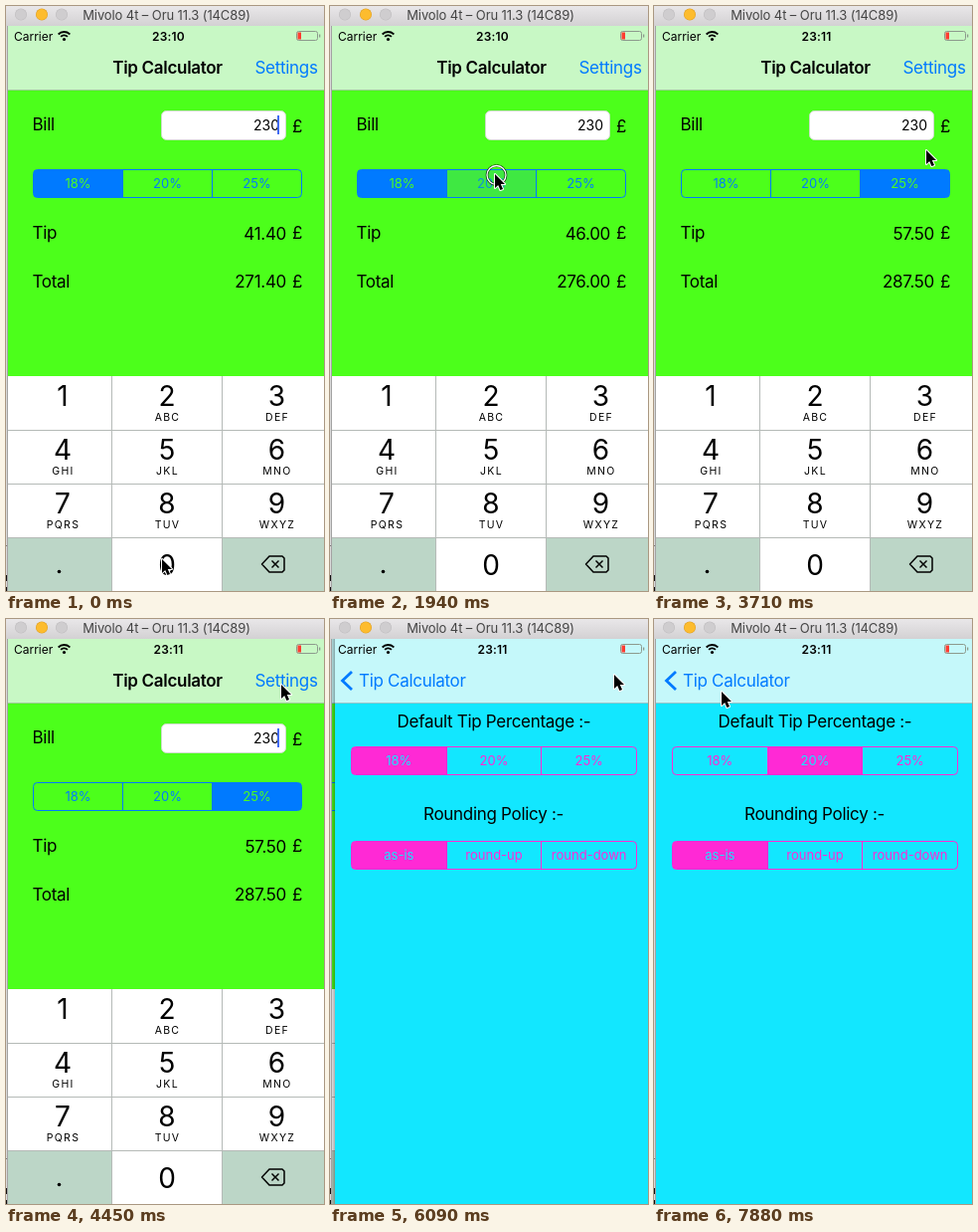
An HTML page with a canvas that plays this animation: 320 px wide and 588 px high, repeating every 8000 ms.

```html
<!DOCTYPE html>
<html lang="en">
<head>
<meta charset="utf-8">
<title>Tip Calculator</title>
<style>
html, body { margin: 0; width: 100%; height: 100%; overflow: hidden; background: #fff; }
canvas { display: block; width: 320px; height: 588px; }
</style>
</head>
<body>
<canvas id="stage"></canvas>
<script>
const W = 320, H = 588, LOOP = 8000, TICK = 148.2;
const canvas = document.getElementById('stage');
const ctx = canvas.getContext('2d');
const dpr = window.devicePixelRatio || 1;
canvas.width = W * dpr;
canvas.height = H * dpr;

const BLUE = [0, 122, 255], GREEN = [76, 255, 27];
const PINK = [255, 41, 213], CYAN = [18, 231, 255];
const rgb = c => `rgb(${c.map(Math.round).join()})`;
const mix = (a, b, f) => a.map((v, i) => v + (b[i] - v) * f);

// Pointer path: tick, x, y
const PATH = [
  [3, 157, 556], [5, 158, 470], [7, 162, 300], [9, 165, 180], [10, 166, 169],
  [15, 166, 169], [17, 205, 172], [19, 253, 174],
  [23, 253, 174], [25, 274, 145], [27, 294, 92], [28, 287, 60], [30, 277, 66],
  [31, 277, 66], [34, 286, 56],
  [42, 286, 56], [44, 235, 98], [46, 166, 137], [47, 160, 139],
  [50, 160, 139], [52, 88, 96], [53, 68, 73]
];
const PRESSES = [[11, 14], [20, 24], [37, 39], [49, 51]];

// Segment fill amounts from a given tick on
const RATE_FILL = [
  [0, [1, 0, 0]], [11, [1, .17, 0]], [14, [0, 1, 0]], [20, [0, 1, .17]],
  [21, [0, .54, .54]], [22, [0, .1, .9]], [23, [0, 0, 1]]
];
const DEFAULT_FILL = [[0, [1, 0, 0]], [49, [1, .17, 0]], [50, [.5, .5, 0]], [51, [0, 1, 0]]];
const latest = (list, k) => list.filter(e => e[0] <= k).pop()[1];

function rect(x, y, w, h, color) {
  ctx.fillStyle = color;
  ctx.fillRect(x, y, w, h);
}

function text(s, x, y, o = {}) {
  const { size = 17, weight = 400, color = '#000', align = 'left', gap = size > 15 ? -.3 : 0 } = o;
  ctx.font = `${weight} ${size}px Inter, Roboto, sans-serif`;
  ctx.letterSpacing = gap + 'px';
  ctx.textAlign = align;
  ctx.fillStyle = color;
  ctx.fillText(s, x, y);
}

function line(points, color, width) {
  ctx.beginPath();
  points.forEach(([x, y]) => ctx.lineTo(x, y));
  ctx.strokeStyle = color;
  ctx.lineWidth = width;
  ctx.stroke();
}

function disc(x, y, r, color) {
  ctx.beginPath();
  ctx.arc(x, y, r, 0, 7);
  ctx.fillStyle = color;
  ctx.fill();
}

function segments(x, y, w, labels, fills, tint, back) {
  const cell = w / labels.length;
  ctx.save();
  ctx.beginPath();
  ctx.roundRect(x, y, w, 28, 4);
  ctx.clip();
  fills.forEach((f, i) => {
    if (f) rect(x + i * cell, y, cell, 28, rgb(mix(back, tint, f)));
  });
  ctx.restore();
  ctx.beginPath();
  ctx.roundRect(x, y, w, 28, 4);
  ctx.strokeStyle = rgb(tint);
  ctx.lineWidth = 1;
  ctx.stroke();
  labels.forEach((s, i) => {
    const left = Math.floor(x + i * cell) + .5;
    if (i) line([[left, y], [left, y + 28]], rgb(tint), 1);
    text(s, x + (i + .5) * cell, y + 18.7,
      { size: 13, align: 'center', color: rgb(mix(tint, back, fills[i])) });
  });
}

function windowFrame() {
  rect(0, 0, W, H, '#fff');
  const g = ctx.createLinearGradient(0, 0, 0, 20);
  g.addColorStop(0, '#e9e7e9');
  g.addColorStop(1, '#d3d1d3');
  rect(0, 0, W, 20, g);
  rect(0, 20, 1, H - 20, '#d9d9d9');
  rect(1, 20, 1, H - 20, '#a3a3a3');
  rect(0, 542, 1, 1, '#777');
  rect(0, 572, 1, 6, '#111');
  rect(0, 584, 1, 4, '#111');
  [[15, '#cfcdcf'], [36, '#fdbc2e'], [56, '#cfcdcf']].forEach(([x, color]) => {
    disc(x, 8.5, 6, color === '#fdbc2e' ? '#e0a023' : '#bfbdbf');
    disc(x, 8.5, 5.4, color);
  });
  text('Mivolo 4t – Oru 11.3 (14C89)', 161.5, 14, { size: 13, align: 'center', color: '#444', gap: -.1 });
}

function statusBar(k) {
  text('Carrier', 8, 34.5, { size: 12 });
  disc(58.5, 33.5, 1.6, '#000');
  [4.6, 8].forEach(r => {
    ctx.beginPath();
    ctx.arc(58.5, 34, r, -Math.PI * .76, -Math.PI * .24);
    ctx.strokeStyle = '#000';
    ctx.lineWidth = 1.9;
    ctx.stroke();
  });
  text(k < 18 ? '23:10' : '23:11', 163.5, 34.5, { size: 12, weight: 600, align: 'center', gap: .2 });
  ctx.beginPath();
  ctx.roundRect(292.5, 25.5, 21, 9, 2);
  ctx.strokeStyle = '#8d9a8d';
  ctx.lineWidth = 1;
  ctx.stroke();
  rect(315, 28.5, 1.3, 3, '#8d9a8d');
  rect(293.5, 26.5, 3.5, 7, '#ff3b30');
}

function keypad() {
  rect(2, 372, 318, 216, '#fff');
  rect(2, 535, 104, 53, '#bcd6c7');
  rect(218, 535, 102, 53, '#bcd6c7');
  [106, 217].forEach(x => rect(x, 372, 1, 216, '#b5bab7'));
  [426, 480, 534].forEach(y => rect(2, y, 318, 1, '#b5bab7'));
  const cols = [57, 162, 272.5];
  ['', 'ABC', 'DEF', 'GHI', 'JKL', 'MNO', 'PQRS', 'TUV', 'WXYZ'].forEach((s, i) => {
    const x = cols[i % 3], y = 402 + Math.floor(i / 3) * 54;
    text(i + 1, x, y, { size: 28, align: 'center', gap: 0 });
    text(s, x + .5, y + 15, { size: 10.5, align: 'center', gap: 1.3 });
  });
  text('0', 162, 571.5, { size: 28, align: 'center', gap: 0 });
  disc(53.5, 568.5, 1.8, '#000');
  ctx.lineJoin = 'round';
  ctx.beginPath();
  [[257.5, 561], [265, 553], [278, 553], [280, 555], [280, 567], [278, 569], [265, 569]]
    .forEach(([x, y]) => ctx.lineTo(x, y));
  ctx.closePath();
  ctx.strokeStyle = '#000';
  ctx.lineWidth = 1.5;
  ctx.stroke();
  line([[267.5, 557.5], [274.5, 564.5]], '#000', 1.5);
  line([[274.5, 557.5], [267.5, 564.5]], '#000', 1.5);
}

function calculator(k) {
  const bill = 230, rate = k < 13 ? .18 : k < 21 ? .2 : .25;
  const tip = bill * rate;
  const right = { align: 'right' };
  rect(2, 20, 318, 64, '#c8f8c5');
  rect(2, 84, 318, 1, '#9ccb94');
  rect(2, 85, 318, 287, rgb(GREEN));
  text('Tip Calculator', 162.5, 68, { weight: 600, align: 'center' });
  ctx.globalAlpha = k < 38 ? 1 : .22;
  text('Settings', 250.5, 68, { color: rgb(BLUE) });
  ctx.globalAlpha = 1;

  text('Bill', 26.5, 125);
  text('Tip', 26.5, 234);
  text('Total', 26.5, 283);
  text(tip.toFixed(2), 282, 235, right);
  text((bill + tip).toFixed(2), 282, 283, right);
  [127, 234, 283].forEach(y => text('£', 298, y, right));

  ctx.beginPath();
  ctx.roundRect(156.5, 105.5, 125, 29, 5);
  ctx.fillStyle = '#fff';
  ctx.fill();
  ctx.strokeStyle = '#cfdccb';
  ctx.lineWidth = 1;
  ctx.stroke();
  text(bill, 275, 125, { size: 14, align: 'right' });
  if (k % 6.75 < 3.5) rect(273, 110, 2, 19, '#426bf2');

  segments(27.5, 164.5, 270, ['18%', '20%', '25%'], latest(RATE_FILL, k), BLUE, GREEN);
  keypad();
}

function settings(k, dx) {
  rect(2, 20, 318, 64, '#c5f8fa');
  rect(2, 84, 318, 1, '#92c5cb');
  ctx.lineJoin = 'miter';
  line([[22, 53], [12.5, 62], [22, 71]], rgb(BLUE), 2.8);
  text('Tip Calculator', 29, 68, { color: rgb(BLUE) });
  ctx.save();
  ctx.translate(dx, 0);
  rect(2, 85, 318, 503, rgb(CYAN));
  text('Default Tip Percentage :-', 162, 109, { align: 'center' });
  text('Rounding Policy :-', 161.5, 202, { align: 'center' });
  segments(18.5, 128.5, 287, ['18%', '20%', '25%'], latest(DEFAULT_FILL, k), PINK, CYAN);
  segments(18.5, 223.5, 287, ['as-is', 'round-up', 'round-down'], [1, 0, 0], PINK, CYAN);
  ctx.restore();
}

function slideIn(k, dx) {
  ctx.save();
  ctx.beginPath();
  ctx.rect(2, 85, dx, 503);
  ctx.clip();
  ctx.translate(-95, 0);
  calculator(k);
  ctx.restore();
  const g = ctx.createLinearGradient(2, 0, 2 + dx, 0);
  g.addColorStop(0, 'rgba(0,0,0,.13)');
  g.addColorStop(1, 'rgba(0,0,0,.32)');
  rect(2, 20, dx, 568, g);
}

function pointer(k) {
  const i = PATH.findIndex(p => p[0] >= k);
  const b = PATH[i < 0 ? PATH.length - 1 : i], a = PATH[Math.max(0, i - 1)];
  const f = i <= 0 ? 1 : (k - a[0]) / (b[0] - a[0]);
  const [, x, y] = mix(a, b, f);
  if (PRESSES.some(([from, to]) => k >= from && k < to)) {
    ctx.beginPath();
    ctx.arc(x + 1.5, y + 1, 9.5, 0, 7);
    ctx.strokeStyle = 'rgba(0,0,0,.75)';
    ctx.lineWidth = 2.6;
    ctx.stroke();
    ctx.strokeStyle = '#fff';
    ctx.lineWidth = 1.3;
    ctx.stroke();
  }
  ctx.beginPath();
  [[0, 0], [0, 14], [3.2, 11], [5.4, 16], [8, 15], [5.8, 10], [10, 10]]
    .forEach(([px, py]) => ctx.lineTo(x + px, y + py));
  ctx.closePath();
  ctx.lineJoin = 'round';
  ctx.strokeStyle = '#fff';
  ctx.lineWidth = 2;
  ctx.stroke();
  ctx.fillStyle = '#000';
  ctx.fill();
}

function draw(ms) {
  const k = Math.floor(ms / TICK);
  ctx.setTransform(dpr, 0, 0, dpr, 0, 0);
  windowFrame();
  if (k < 41) {
    calculator(k);
  } else {
    const dx = k === 41 ? 3 : 0;
    settings(k, dx);
    if (dx) slideIn(k, dx);
  }
  statusBar(k);
  pointer(k);
}

const start = performance.now();
function loop() {
  draw((performance.now() - start) % LOOP);
  requestAnimationFrame(loop);
}
loop();
</script>
</body>
</html>
```
